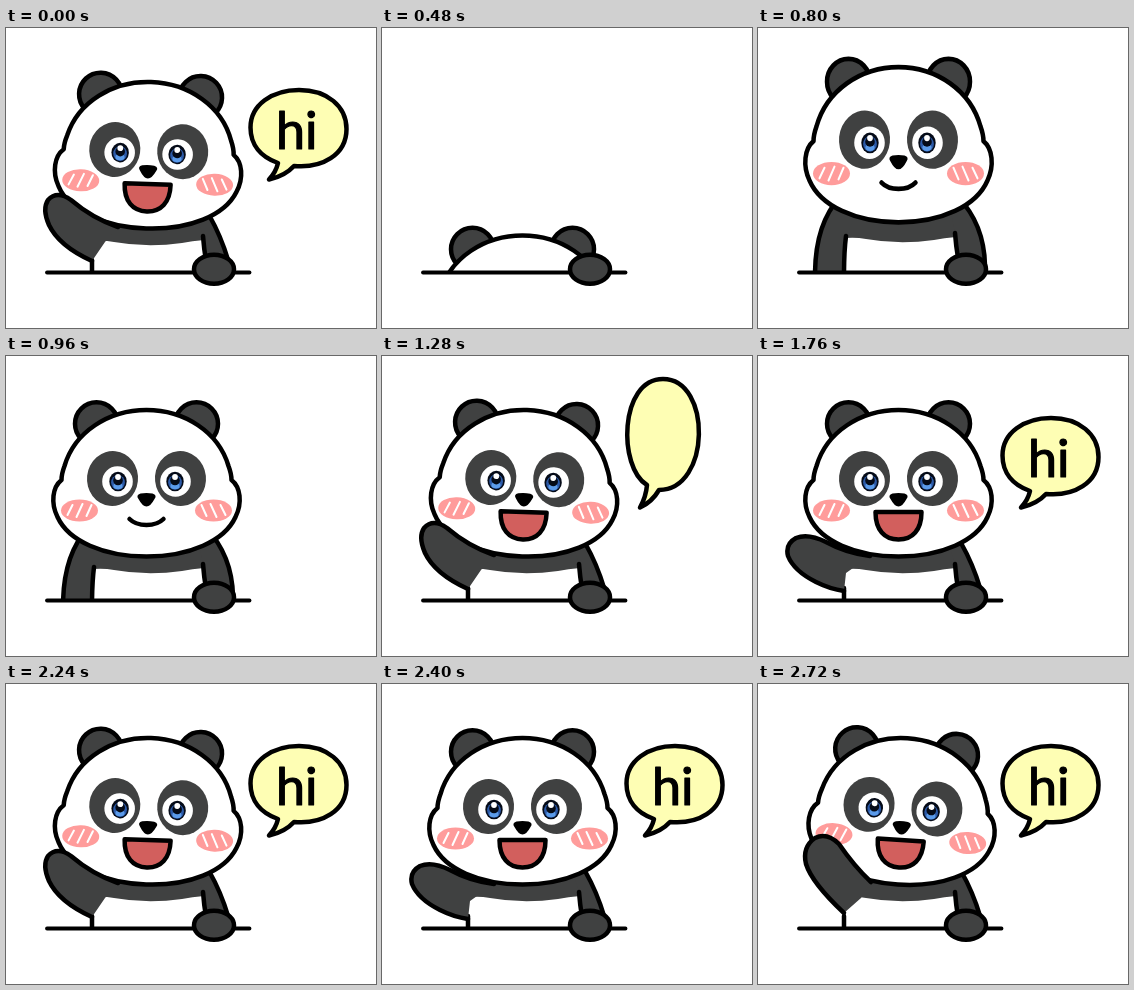
Write an HTML page that moves like this. It is 370 by 300 pixels and loops after 2880 ms.

```html
<!DOCTYPE html>
<html lang="en">
<head>
<meta charset="utf-8">
<title>Waving panda</title>
<style>
  html, body { margin: 0; width: 100%; height: 100%; overflow: hidden; background: #fff; }
  svg { display: block; width: 370px; height: 300px; }
  .ink { stroke: #000; stroke-width: 4.5; stroke-linecap: round; stroke-linejoin: round; }
  .dark { fill: #404141; }
  .white { fill: #fff; }
  .line { fill: none; }
  #table { stroke-width: 3.8; }
  #balloon { fill: #fefeb4; vector-effect: non-scaling-stroke; }
  #hi { font: 52px Lato, "Open Sans", sans-serif; stroke: #000; stroke-width: 1.2; stroke-linejoin: round; }
</style>
</head>
<body>
<svg viewBox="0 0 370 300">
  <defs>
    <clipPath id="above"><path d="M0 0H370V244H0Z"/></clipPath>
    <g id="ear"><circle class="ink dark" cx="-50" cy="67.800" r="21.500"/></g>
    <g id="side">
      <ellipse class="dark" cx="-34" cy="122.500" rx="25.500" ry="27.500" transform="rotate(6 -34 122.500)"/>
      <circle class="white" cx="-29" cy="125.500" r="15.300"/>
      <ellipse cx="-28.500" cy="125.500" rx="8.700" ry="9.800" fill="#050b18"/>
      <ellipse cx="-28.500" cy="126.500" rx="6.900" ry="7.300" fill="#2c5aa8"/>
      <ellipse cx="-28.500" cy="130" rx="4.600" ry="3.200" fill="#5b9bea"/>
      <circle cx="-28.500" cy="124.500" r="4.800" fill="#050b18"/>
      <circle class="white" cx="-28.500" cy="121" r="2.900"/>
      <ellipse cx="-67" cy="154.500" rx="18.500" ry="11" fill="#ff9c9b"/>
      <path d="M-79 159l5-10M-70 161l6-13M-60 160l5-11" stroke="#fff" stroke-width="2" stroke-linecap="round"/>
    </g>
  </defs>

  <g clip-path="url(#above)">
    <g id="body">
      <path class="white" d="M86 250V205H201V250Z"/>
      <path class="dark" d="M80 185H203L198 212Q186 213 176 215Q141 220 108 214Q98 212 87 213Z"/>
      <g id="rest">
        <path class="dark" d="M82 172Q57 199 57 250H86L88 211L100 185ZM190 172H200Q226 199 227 250H200L197 208Z"/>
        <path class="ink line" d="M82 172Q57 199 57 250M88 211Q86 227 86 250M200 172Q226 199 227 240"/>
      </g>
      <g id="lean">
        <path class="dark" d="M190 187H203Q215 208 222 232L200 236L197 207Z"/>
        <path class="ink line" d="M203 187Q215 208 222 232M86 232V244"/>
      </g>
      <path class="ink line" d="M197 208Q198 221 200 233"/>
    </g>
    <g id="head">
      <g transform="translate(140.5 0)">
        <use href="#ear"/><use href="#ear" transform="scale(-1 1)"/>
        <path class="ink white" d="M0 54C-38 54 -72 76 -82 110Q-85 118 -85 124C-94 131 -96 147 -89 161C-78 185 -43 200.500 0 200.500C43 200.500 78 185 89 161C96 147 94 131 85 124Q85 118 82 110C72 76 38 54 0 54Z"/>
        <use href="#side"/><use href="#side" transform="scale(-1 1)"/>
        <path d="M-6 137.500Q0 136.500 6 137.500Q11 139 8 143Q4 150.500 0 150.500Q-4 150.500 -8 143Q-11 139 -6 137.500Z"/>
        <path id="smile" class="ink line" d="M-17 163Q-11 169 0 169Q11 169 17 163"/>
        <path id="laugh" class="ink" fill="#d25f5d" d="M-23 156H23C23 174 14 183.500 0 183.500C-14 183.500 -23 174 -23 156Z"/>
      </g>
    </g>
    <path id="armFill" class="dark"/>
    <path id="arm" class="ink line"/>
  </g>

  <path id="table" class="ink line" d="M41 244.500H243.500"/>
  <ellipse id="paw" class="ink dark" cx="208" cy="241.300" rx="20" ry="14.500"/>
  <path id="balloon" class="ink"/>
  <text id="hi" x="270" y="120.500">hi</text>
</svg>
<script>
const STEP = 160, STEPS = 18;
const $ = id => document.getElementById(id);
const show = (id, on) => $(id).style.display = on ? '' : 'none';

// Raised arm from low to high: outline, then the corner that closes its fill
const arms = [
  ['M112 200Q88 197 68 186Q50 177 38 182Q27 188 30 200Q36 215 58 226Q72 233 86 235', 'L88 217Z'],
  ['M112 199Q86 190 65 172Q51 162 42 172Q36 181 43 197Q53 218 86 233', 'L99 214Z'],
  ['M113 198Q96 182 81 160Q69 148 57 154Q44 163 48 180Q54 199 86 229', 'L103 214Z']
];
const tall = 'M265 129C236 112 237 23 281 23C330 23 329 134 277 134Q270 146 258 151.500Q264 141 265 129Z';
const wide = 'M272 135C255 129 244.500 117 244.500 99.500C244.500 77 266 62 293 62C321 62 340.500 78 340.500 101C340.500 127 316 140.500 288 138Q279 148 263 151.500Q270 144 272 135Z';

function headPose(n, swing) {
  if (n === 3) return 'translate(0 153.5)';
  if (n === 4) return 'translate(0 42)';
  if (n === 5) return 'translate(0 -18.2) scale(1 1.06)';
  return `rotate(${1.9 * swing} 140.5 190)`;
}

function draw(now) {
  // The first step closes the previous greeting
  const n = Math.floor(now / STEP) % STEPS || STEPS;
  const waving = n >= 7;
  const swing = waving ? [0, 1, 2, 1][(n - 7) % 4] : 0;
  show('paw', n >= 2);
  show('head', n >= 3);
  show('body', n >= 5);
  show('rest', !waving);
  show('smile', !waving);
  for (const id of ['lean', 'laugh', 'arm', 'armFill', 'balloon']) show(id, waving);
  show('hi', n >= 9);

  $('head').setAttribute('transform', headPose(n, swing));
  $('body').setAttribute('transform', n === 5 ? 'translate(0 -3)' : '');
  const [outline, corner] = arms[swing];
  $('arm').setAttribute('d', outline);
  $('armFill').setAttribute('d', outline + corner);
  $('balloon').setAttribute('d', n < 9 ? tall : wide);
  $('balloon').setAttribute('transform', n === 7 ? 'translate(260 151) scale(.68 .73) translate(-260 -151)' : '');
  requestAnimationFrame(() => draw(performance.now() - start));
}
const start = performance.now();
draw(0);
</script>
</body>
</html>
```
